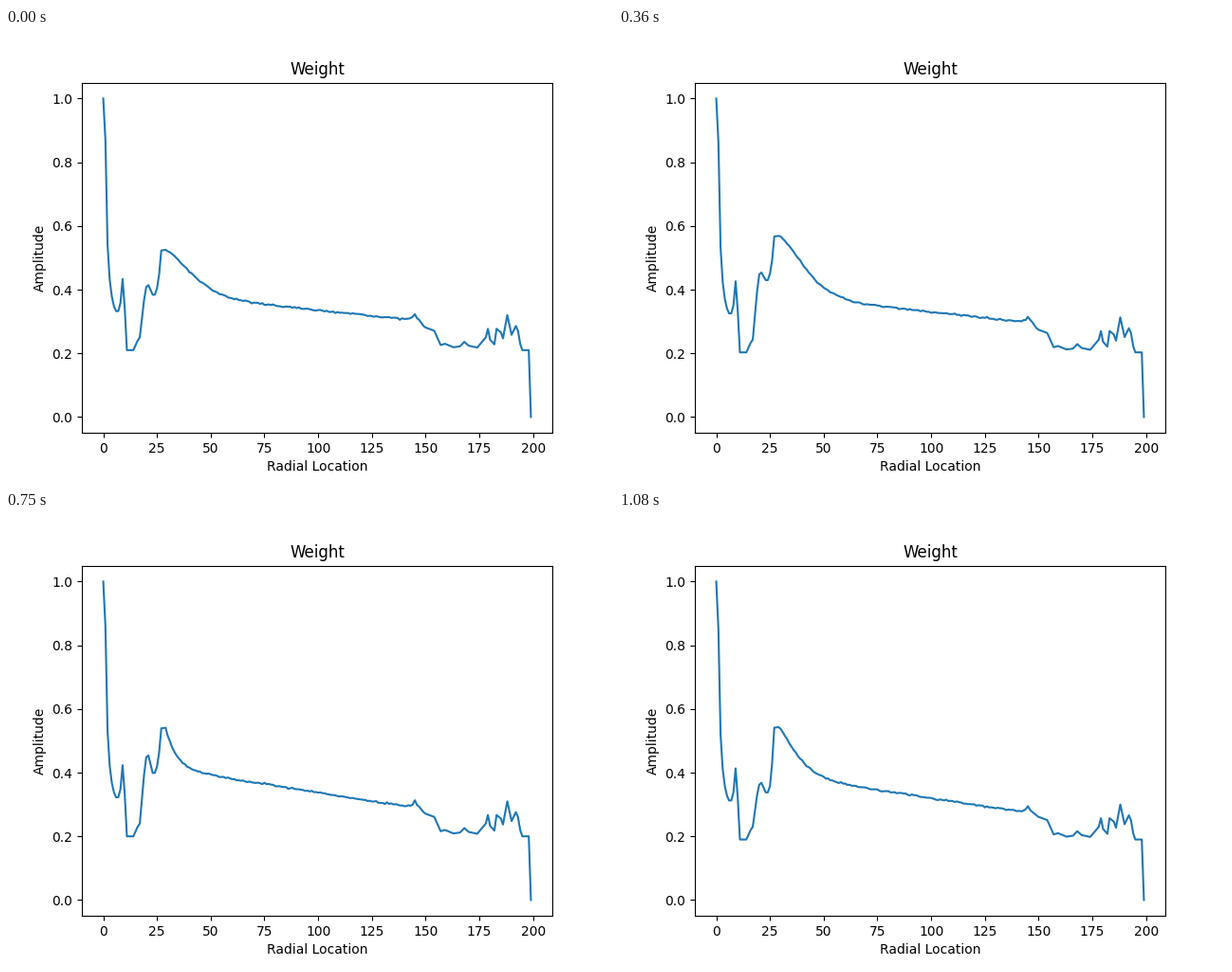
Animation, 640 px wide and 480 px high, one loop 1110 ms. Source, as a matplotlib script:

```python
import numpy as np
import matplotlib.pyplot as plt
from matplotlib.animation import FuncAnimation

FRAMES, INTERVAL = 37, 30
x = np.arange(200)

# Key poses, interpolated over the loop; levels in thousandths:
# step, base, hump, dip, peak, mid level, end level, decay length, decay power
POSES = np.array([
    [0, 210, 414, 384, 525, 341, 307, 16, 1.5],
    [8, 207, 460, 438, 531, 340, 306, 13, 1.0],
    [15, 200, 449, 424, 597, 333, 296, 18, 2.0],
    [21, 205, 428, 360, 502, 342, 299, 26, 0.9],
    [25, 200, 454, 399, 541, 346, 295, 5, 1.0],
    [29, 195, 436, 391, 539, 335, 280, 5.7, 1.2],
    [36, 190, 368, 338, 543, 328, 279, 11, 1.3],
])

# Jagged tail: locations and heights above the base level
TAIL_X = [150, 154, 157, 159, 163, 166, 168, 170, 174, 178, 179, 180,
          182, 183, 185, 186, 188, 190, 192, 193, 194, 195]
TAIL_Y = [71, 61, 16, 20, 9, 12, 26, 14, 8, 40, 67, 33,
          18, 67, 56, 37, 110, 48, 76, 60, 20, 0]


def weights(i):
    step, *cols = POSES.T
    base, hump, dip, peak, mid, end, length, power = (
        np.interp(i, step, col) for col in cols)

    # Straight slope plus a stretched exponential falling from the peak
    slope = mid + (end - mid) * (x - 92) / 48
    fall = np.exp(-(np.maximum(x - 29, 0) / length) ** power)
    y = slope + (peak - slope[29]) * fall
    y += 20 * np.exp(-np.abs(x - 145) / 1.5)
    y += np.random.default_rng(i).normal(0, 1.4, x.size)

    # Hyperbolic drop with a narrow spike, then a flat floor
    head = x[1:11]
    y[1:11] = base + 660 / head + 150 * np.exp(-np.abs(head - 9) / 1.2)

    # Rise from the floor through the hump and dip to the peak
    shelf = base + 40
    y[11:30] = np.interp(
        x[11:30],
        [14, 16, 17, 19, 20, 21, 23, 24, 25, 26, 27, 29],
        [base, shelf - 10, shelf, shelf + 0.72 * (hump - shelf),
         hump - 6, hump, dip, dip, dip + 20,
         dip + 0.45 * (peak - dip), peak - 2, peak])

    y[147:150] = np.linspace(end - 2, base + 76, 3)
    y[150:] = base + np.interp(x[150:], TAIL_X, TAIL_Y)
    y[0], y[-1] = 1000, 0
    return y / 1000


fig, ax = plt.subplots(figsize=(6.4, 4.8), dpi=100)
line, = ax.plot(x, weights(0))
ax.set_title("Weight")
ax.set_xlabel("Radial Location")
ax.set_ylabel("Amplitude")


def update(i):
    line.set_ydata(weights(i))
    return line,


anim = FuncAnimation(fig, update, frames=FRAMES, interval=INTERVAL,
                     repeat=True, repeat_delay=0)
plt.show()
```
